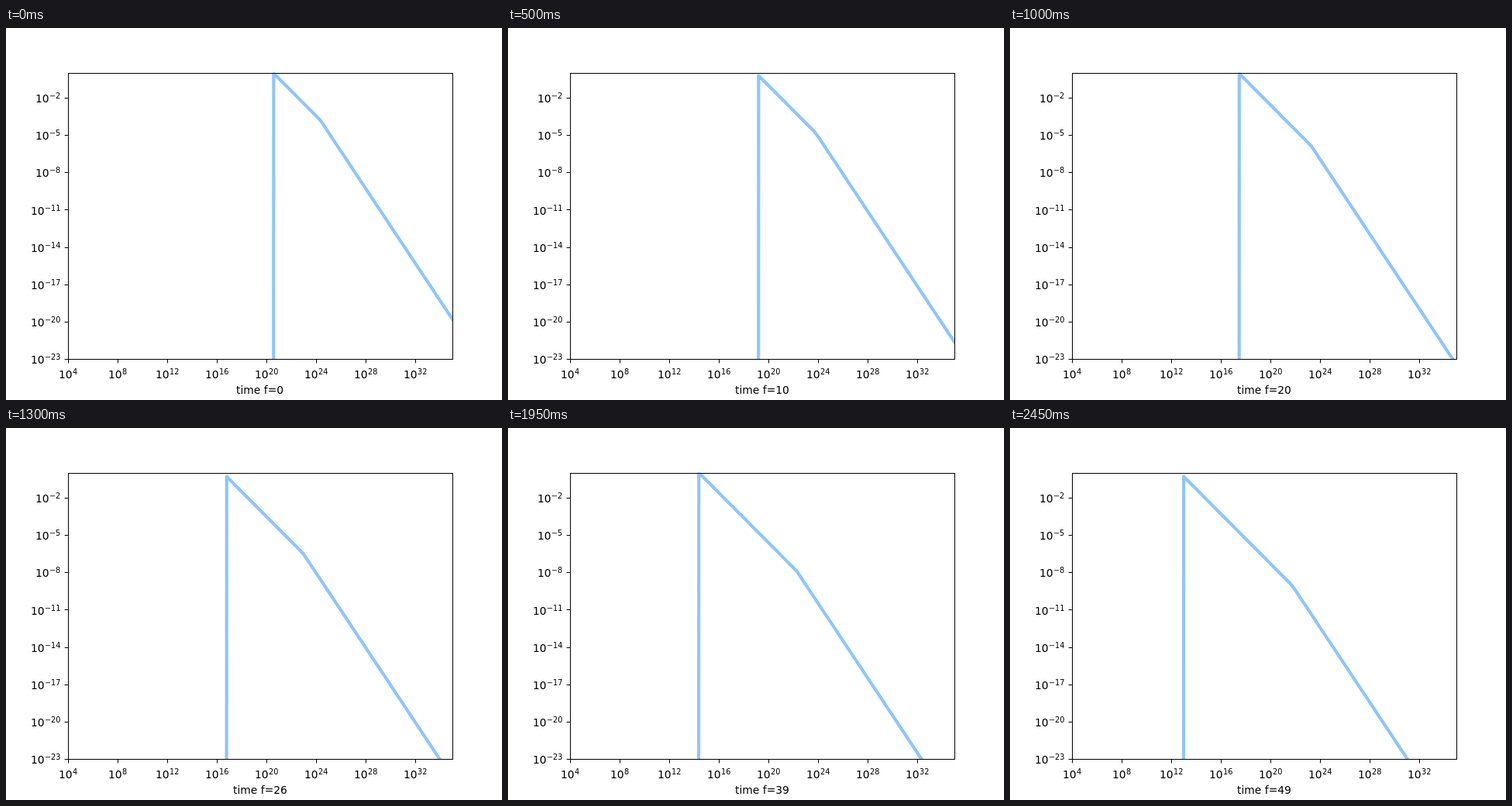
Animation, 640 px wide and 480 px high, one loop 2500 ms. Source, as an HTML page with a canvas:

```html
<!DOCTYPE html>
<html>
<head>
<meta charset="utf-8">
<style>
html, body { margin: 0; overflow: hidden; background: #fff; }
canvas { display: block; }
</style>
</head>
<body>
<canvas id="stage" width="640" height="480"></canvas>
<script>
const ctx = document.getElementById('stage').getContext('2d');
const FRAMES = 50, FRAME_MS = 50;
const LEFT = 80, TOP = 57.6, WIDTH = 496, HEIGHT = 369.6;
const DECADE_X = WIDTH / 31, DECADE_Y = HEIGHT / 23;
const GRID_START = 345.4, GRID_STEP = 5.511;  // sample spacing of the curve, in px

const font = size => `${size}px "DejaVu Sans", sans-serif`;
const snap = v => Math.floor(v + 0.5) + 0.5;

function segment(x1, y1, x2, y2) {
  ctx.beginPath();
  ctx.moveTo(x1, y1);
  ctx.lineTo(x2, y2);
  ctx.stroke();
}

// Draws 10^exponent; align is the share of its width left of x.
function power(exponent, x, baseline, align) {
  const sup = String(exponent).replace('-', '\u2212');
  ctx.font = font(9.72);
  const supWidth = ctx.measureText(sup).width;
  ctx.font = font(13.89);
  const baseWidth = ctx.measureText('10').width;
  const start = Math.round(x - (baseWidth + supWidth) * align);
  ctx.fillText('10', start, baseline);
  ctx.font = font(9.72);
  ctx.fillText(sup, start + baseWidth + 0.3, baseline - 5.3);
}

function drawAxes() {
  ctx.strokeStyle = ctx.fillStyle = '#000';
  ctx.lineWidth = 1;
  ctx.strokeRect(80.5, 58.5, 496, 369);
  for (let e = 4; e <= 32; e += 4) {
    const x = LEFT + (e - 4) * DECADE_X;
    segment(snap(x), 428, snap(x), 432.4);
    power(e, x, 452, 0.5);
  }
  for (let e = -2; e >= -23; e -= 3) {
    const y = TOP - e * DECADE_Y;
    segment(75.6, snap(y), 80, snap(y));
    power(e, 70.3, Math.round(y + 6.2), 1);
  }
}

// Zero before the onset, then slope -1, then slope -3/2 past the knee.
function drawCurve(n) {
  const onset = 344.6 - 2.5 * n - 0.2 * Math.max(0, n - 34);
  const knee = 405.3 - 0.84 * n;
  const peak = GRID_START - GRID_STEP * Math.floor((GRID_START - onset) / GRID_STEP);
  ctx.save();
  ctx.beginPath();
  ctx.rect(LEFT, TOP, WIDTH, HEIGHT);
  ctx.clip();
  ctx.beginPath();
  ctx.moveTo(peak - GRID_STEP, TOP + 1000 * DECADE_Y);
  for (let x = peak; x < LEFT + WIDTH + 2 * GRID_STEP; x += GRID_STEP) {
    const decades = (x - onset + Math.max(0, x - knee) / 2) / DECADE_X;
    ctx.lineTo(x, TOP + decades * DECADE_Y);
  }
  ctx.strokeStyle = '#8ec5ff';
  ctx.lineWidth = 4.17;
  ctx.lineJoin = 'round';
  ctx.stroke();
  ctx.restore();
}

function drawLabel(n) {
  const label = `time f=${n}`;
  ctx.font = font(13.89);
  ctx.fillText(label, Math.round(328 - ctx.measureText(label).width / 2), 472);
}

function draw() {
  const n = Math.floor(performance.now() / FRAME_MS) % FRAMES;
  ctx.fillStyle = '#fff';
  ctx.fillRect(0, 0, 640, 480);
  drawCurve(n);
  drawAxes();
  drawLabel(n);
  requestAnimationFrame(draw);
}
draw();
</script>
</body>
</html>
```
